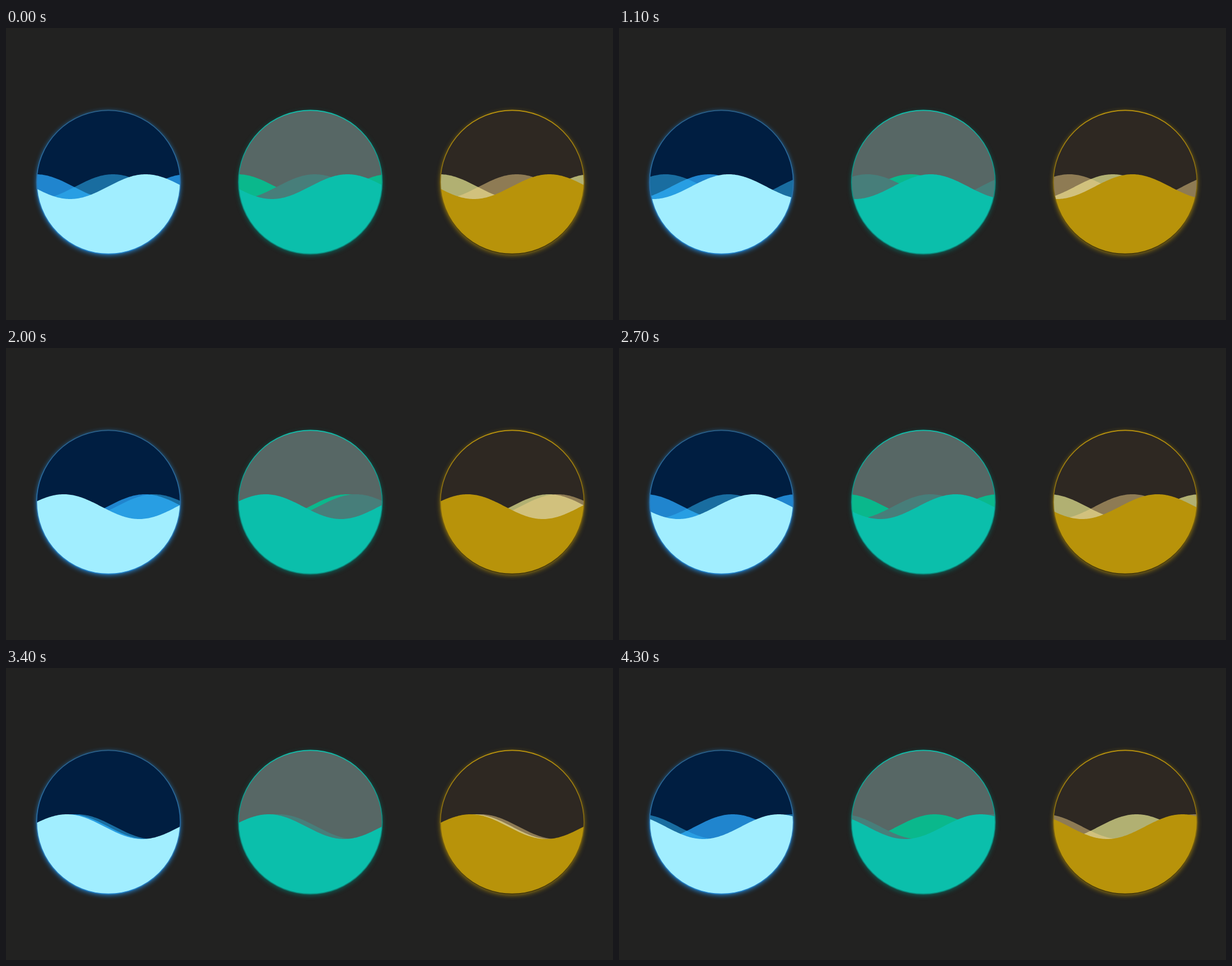
An HTML page with a canvas for the animation above (4400 ms loop, 1078 by 519 pixels).

```html
<!DOCTYPE html>
<html lang="en">
<head>
<meta charset="utf-8">
<title>Liquid gauges</title>
<style>
  html, body { margin: 0; width: 100%; height: 100%; overflow: hidden; background: #222221; }
  canvas { display: block; }
</style>
</head>
<body>
<canvas id="stage" width="1078" height="519"></canvas>
<script>
const ctx = document.getElementById('stage').getContext('2d');
const LOOP = 4400, STEP = 100;
const CY = 274, RADIUS = 127;
const LEVEL = 282, AMPLITUDE = 22, WAVELENGTH = 268;

// Crest position relative to the gauge centre, and speed in px per ms
const waves = [
  { crest: -129, speed: 0.097 },
  { crest: 8, speed: -0.0975 },
  { crest: 66, speed: 0.1953 }
];

const gauges = [
  { x: 182, back: '#001e41', glow: '#2387d6', rim: ['#2a5f88', '#2a70a8', '#2180c8'],
    fills: ['#2085ce', 'rgba(48,183,247,.52)', '#a1eeff'] },
  { x: 540.5, back: '#576765', glow: '#0a6a60', rim: ['#10c2ae', '#0b8d80', '#0a8c7e'],
    fills: ['#0ab88c', '#477e7a', '#0bbfab'] },
  { x: 899, back: '#2e2822', glow: '#9a7b10', rim: ['#bd960c', '#826810', '#40350a'],
    fills: ['#b1b072', 'rgba(241,211,138,.49)', '#b8930a'] }
];

function disc(x, radius) {
  ctx.beginPath();
  ctx.arc(x, CY, radius, 0, Math.PI * 2);
}

function fillWave(x, crest, color) {
  const left = x - RADIUS - 2, right = x + RADIUS + 2;
  ctx.beginPath();
  ctx.moveTo(left, CY + RADIUS + 2);
  for (let px = left; px <= right; px += 2) {
    ctx.lineTo(px, LEVEL - AMPLITUDE * Math.cos((px - crest) / WAVELENGTH * Math.PI * 2));
  }
  ctx.lineTo(right, CY + RADIUS + 2);
  ctx.fillStyle = color;
  ctx.fill();
}

function drawGauge({ x, back, glow, rim, fills }, t) {
  ctx.save();
  ctx.shadowColor = glow;
  ctx.shadowBlur = 8;
  ctx.shadowOffsetY = 2;
  ctx.fillStyle = back;
  disc(x, RADIUS + 0.5);
  ctx.fill();
  ctx.restore();

  ctx.save();
  disc(x, RADIUS + 0.5);
  ctx.clip();
  waves.forEach(({ crest, speed }, i) => fillWave(x, x + crest + speed * t, fills[i]));
  ctx.restore();

  const gradient = ctx.createLinearGradient(0, CY - RADIUS, 0, CY + RADIUS);
  rim.forEach((color, i) => gradient.addColorStop(i / 2, color));
  ctx.strokeStyle = gradient;
  ctx.lineWidth = 1.6;
  disc(x, RADIUS + 0.6);
  ctx.stroke();
}

function draw() {
  const t = Math.floor(performance.now() % LOOP / STEP) * STEP;
  ctx.fillStyle = '#222221';
  ctx.fillRect(0, 0, 1078, 519);
  gauges.forEach(gauge => drawGauge(gauge, t));
  requestAnimationFrame(draw);
}
draw();
</script>
</body>
</html>
```
